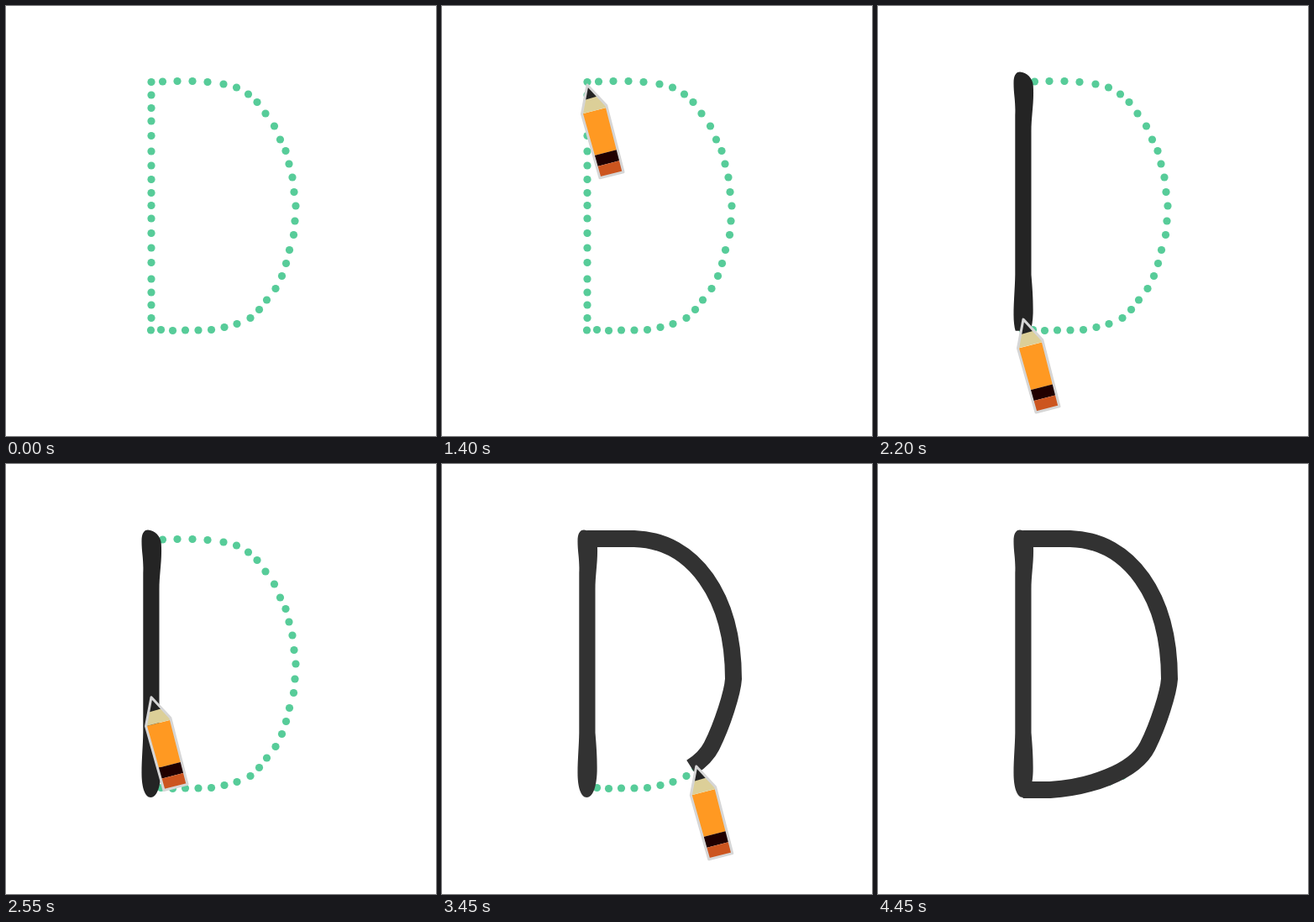
Animation, 512 px wide and 512 px high, one loop 5.5 s. Source, as an HTML page:

```html
<!DOCTYPE html>
<html lang="en">
<head>
<meta charset="utf-8">
<title>Tracing the letter D</title>
<style>
  html, body { margin: 0; width: 100%; height: 100%; overflow: hidden; background: #fff; }
  svg { display: block; width: 100vw; height: 100vh; }
</style>
</head>
<body>
<svg viewBox="0 0 512 512">
  <defs>
    <clipPath id="reveal"><rect id="curtain" x="150" y="70" width="50" height="0"/></clipPath>
  </defs>
  <g id="dots" fill="#57cc99"></g>
  <g id="ink">
    <path clip-path="url(#reveal)" fill="currentColor" d="M161.5 92C161.5 83 164 78.5 169 78.5C177 79 184.5 86 184.8 95
      C186 116 182.5 130 182.5 150V320C184 338 184.8 350 184.6 366C184 386 179 397 172.5 397
      C165 397 161.5 384 161.5 368C161.5 350 163 338 163.3 320V130C164 112 161.5 106 161.5 92Z"/>
    <path id="bowl" fill="none" stroke="currentColor" stroke-width="20" stroke-linejoin="round"
      d="M172.5 89H229C300 91 347 158 347 256C346 272 334 310 321 336C305 368 250 385 205 388H172.5"/>
  </g>
  <g id="pencil">
    <path fill="#ff9922" d="M-6.5 34.5L22.8 27L36 77L8.5 84Z"/>
    <path fill="#dccf98" d="M-3 17L11 13.5L22.8 24.5L22.3 27L-5.5 34.2Z"/>
    <path fill="#242424" d="M0 0L12 13.5L-3.5 18Z"/>
    <path fill="#200000" d="M8.5 84L35.6 77L39 90L12 97Z"/>
    <path fill="#cc551f" d="M12 97L39 90L43 103.7L15 110.8Z"/>
    <path fill="none" stroke="#d6d6d6" stroke-width="3" stroke-linejoin="round"
      d="M0 0L22.8 24.5L43 103.7L15 110.8L-6.5 34.5Z"/>
  </g>
</svg>
<script>
const LOOP = 5500, STEP = 50;
const $ = id => document.getElementById(id);
const clamp = v => Math.max(0, Math.min(1, v));

const stemDots = [90.5, 106, 121.5, 137, 154.5, 173, 190, 206.5, 222.5, 237.5, 253, 270.5, 288, 305.5, 325, 341, 356, 371.5];
const bowlDots = [
  [186.5, 90], [204, 89.5], [222, 89.5], [240, 90.5], [259, 93], [274.5, 97], [288.5, 105],
  [299, 114.5], [309, 128], [319.5, 143], [326.5, 159], [333, 172.5], [337, 188], [341, 204],
  [343, 221.5], [345, 238], [344, 256], [342.5, 272.5], [337.5, 290.5], [333.5, 306.5],
  [328.5, 321.5], [321, 336.5], [310.5, 350], [301.5, 361.5], [291, 371.5], [275, 378.5],
  [260, 382.5], [244.5, 385.5], [229, 386], [213.5, 386], [198.5, 386.5], [184.5, 385.5], [172.5, 386]
];
for (const [x, y] of [...stemDots.map(y => [173, y]), ...bowlDots]) {
  const dot = document.createElementNS("http://www.w3.org/2000/svg", "circle");
  dot.setAttribute("cx", x);
  dot.setAttribute("cy", y);
  dot.setAttribute("r", 4.6);
  $("dots").append(dot);
}

// Smooth monotone curve through [time, value] keys, flat at both ends.
function track(keys) {
  const slope = i => (keys[i + 1][1] - keys[i][1]) / (keys[i + 1][0] - keys[i][0]);
  const tangents = keys.map((_, i) => {
    if (i === 0 || i === keys.length - 1) return 0;
    const a = slope(i - 1), b = slope(i);
    return a * b > 0 ? 2 * a * b / (a + b) : 0;
  });
  return t => {
    if (t <= keys[0][0]) return keys[0][1];
    const i = keys.findIndex(k => k[0] >= t) - 1;
    if (i < 0) return keys[keys.length - 1][1];
    const [t0, v0] = keys[i], [t1, v1] = keys[i + 1];
    const d = t1 - t0, u = (t - t0) / d, w = 1 - u;
    return w * w * (1 + 2 * u) * v0 + u * u * (3 - 2 * u) * v1
      + d * u * w * (w * tangents[i] - u * tangents[i + 1]);
  };
}

const tipDown = track([[1360, 92], [1400, 94], [1550, 149], [1850, 280], [2150, 361], [2290, 387]]);
const stemEnd = track([[1400, 78], [1550, 138], [1850, 287], [2150, 376], [2300, 400]]);
const bowlPart = track([[2950, 0], [3000, .035], [3150, .29], [3350, .633], [3450, .744], [3700, .93], [3950, 1]]);
const tipUp = t => 387 - 295 * (1 - Math.cos(Math.PI * clamp((t - 2300) / 600))) / 2;

const bowl = $("bowl"), length = bowl.getTotalLength();

function tipAt(t) {
  if (t < 2300) return [173, tipDown(t)];
  if (t < 2950) return [173, tipUp(t)];
  const p = bowl.getPointAtLength(length * bowlPart(t));
  return [p.x, p.y + 3];
}

function draw(t) {
  $("curtain").setAttribute("height", stemEnd(t) - 70);

  const drawn = t < 2950 ? 0 : clamp(bowlPart(t) + .014) * length;
  bowl.style.display = drawn ? "" : "none";
  bowl.setAttribute("stroke-dasharray", `${drawn} ${length + 10}`);
  $("ink").style.color = t < 3000 ? "#242424" : "#323232";

  const [x, y] = tipAt(t);
  $("pencil").setAttribute("transform", `translate(${x} ${y})`);
  $("pencil").setAttribute("opacity", t < 1000 ? 0 : Math.min(clamp((t - 950) / 450), clamp((4450 - t) / 500)));
}

const start = performance.now();
function tick() {
  const t = (performance.now() - start) % LOOP;
  draw(Math.floor(t / STEP) * STEP);
  requestAnimationFrame(tick);
}
tick();
</script>
</body>
</html>
```
